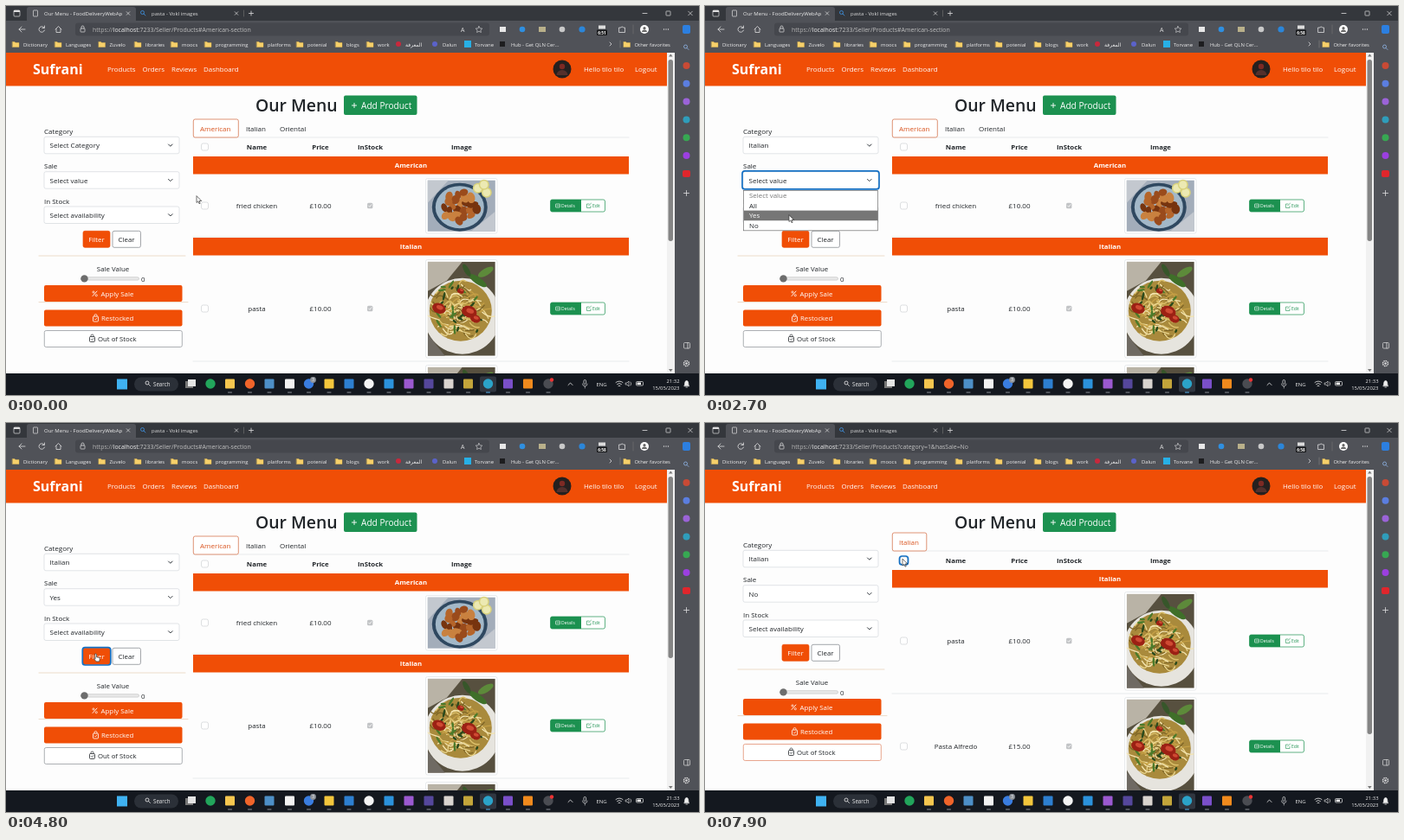
These frames come from a looping animation (800 px wide and 450 px high, 8000 ms). An HTML page:

```html
<!DOCTYPE html>
<html lang="en">
<head>
<meta charset="utf-8">
<style>
  html, body { margin: 0; width: 100%; height: 100%; overflow: hidden; background: #fff; }
  svg { display: block; width: 800px; height: 450px; font-family: "Open Sans", "Noto Sans", sans-serif; }
</style>
</head>
<body>
<svg viewBox="0 0 800 450">
  <defs id="defs"></defs>
  <g id="page"></g>
  <g id="chrome"></g>
  <g id="overlay"></g>
</svg>
<script>
const ORANGE = '#f04e06', INK = '#212529', GREEN = '#1c9150', LINE = '#dee2e6', BLUE = '#1470c4';
const LOOP = 8000, STEP = 100, ITEM = 11.6;
const $ = id => document.getElementById(id);

// SVG string helpers
const rect = (x, y, w, h, fill, more = '') => `<rect x="${x}" y="${y}" width="${w}" height="${h}" fill="${fill}" ${more}/>`;
const dot = (x, y, r, fill, more = '') => `<circle cx="${x}" cy="${y}" r="${r}" fill="${fill}" ${more}/>`;
const oval = (x, y, rx, ry, fill, turn = 0) =>
  `<ellipse rx="${rx}" ry="${ry}" fill="${fill}" transform="translate(${x} ${y}) rotate(${turn})"/>`;
const path = (d, stroke, w = 0.8, fill = 'none') =>
  `<path d="${d}" fill="${fill}" stroke="${stroke}" stroke-width="${w}" stroke-linejoin="round" stroke-linecap="round"/>`;
const text = (x, y, s, size = 8, fill = INK, more = '') => `<text x="${x}" y="${y}" font-size="${size}" fill="${fill}" ${more}>${s}</text>`;
const mid = (x, y, s, size, fill, more = '') => text(x, y, s, size, fill, `text-anchor="middle" ${more}`);
const bold = 'font-weight="700"';
const box = (x, y, w, h, fill, stroke, r = 2, sw = 0.7) => rect(x, y, w, h, fill, `rx="${r}" stroke="${stroke}" stroke-width="${sw}"`);
const hline = (x1, x2, y, color = LINE, w = 0.7) => path(`M${x1} ${y}H${x2}`, color, w);
const magnifier = (x, y, c) => dot(x, y, 2, 'none', `stroke="${c}" stroke-width=".8"`) + path(`M${x + 1.5} ${y + 1.5}l2 2`, c);
const cross = (x, y, r, c) => path(`M${x - r} ${y - r}l${2 * r} ${2 * r}m0 ${-2 * r}l${-2 * r} ${2 * r}`, c, 0.7);
const plus = (x, y, r, c, w = 0.8) => path(`M${x - r} ${y}h${2 * r}M${x} ${y - r}v${2 * r}`, c, w);

function random(seed) {
  return () => (seed = seed * 16807 % 2147483647) / 2147483647;
}

function pastaPhoto() {
  const rnd = random(11), between = (a, b) => a + (b - a) * rnd();
  let s = rect(0, 0, 78, 109, '#57503f') + path('M0 0H40L22 22 0 34z', 'none', 0, '#b9b3a6')
    + path('M0 109V84L20 109z', 'none', 0, '#6f6a63') + oval(40, 63, 44, 44, '#e6e4de') + oval(38, 57, 36, 35, '#a98a3c');
  const tones = ['#ecd892', '#dcc06a', '#7d6425', '#f3e4b0', '#c59f45'];
  for (let i = 0; i < 95; i++) {
    const a = between(0, 6.3), d = between(0, 31), x = 37 + d * Math.cos(a), y = 56 + d * Math.sin(a);
    s += path(`M${x - between(3, 9)} ${y}q${between(2, 9)} ${between(-12, 12)} ${between(8, 16)} ${between(-5, 7)}`, tones[i % 5], 1.3);
  }
  for (let i = 0; i < 26; i++) s += oval(between(8, 68), between(26, 88), between(2, 6), 1.3, i % 2 ? '#4b7a2a' : '#2b4a1c', between(0, 180));
  for (const [x, y, r] of [[13, 54, 8], [48, 58, 9], [55, 66, 6], [38, 34, 4]])
    s += oval(x, y, r, r * 0.75, '#9c2114', 20) + oval(x + 1, y - 1, r * 0.5, r * 0.3, '#cf4a33', 20);
  return s + oval(58, 22, 12, 4, '#3f6f29', 35) + oval(67, 12, 10, 4, '#5d8a3a', -30) + oval(45, 10, 8, 3, '#37562a', 60);
}

function chickenPhoto() {
  const rnd = random(5);
  let s = rect(0, 0, 78, 59, '#a3adba') + path('M0 0H24L0 26zM78 59H50L78 36z', 'none', 0, '#c3c8cf')
    + oval(37, 31, 32, 28, '#2f4860') + oval(37, 31, 28, 24.5, '#a3b8c8');
  for (const [x, y] of [[58, 9], [68, 14], [65, 5]]) s += dot(x, y, 6, '#d9d27c') + dot(x, y, 4.5, '#ece9b2');
  const tones = ['#b5652a', '#77340f', '#c9813f', '#9a4b1c'];
  for (let i = 0; i < 24; i++) {
    const a = i * 2.4, d = 4.3 * Math.sqrt(i);
    s += oval(37 + d * Math.cos(a), 31 + d * 0.85 * Math.sin(a), 4 + 3 * rnd(), 3 + 2 * rnd(), tones[i % 4], 180 * rnd());
  }
  return s;
}

$('defs').innerHTML = '<clipPath id="crop"><rect width="78" height="109"/></clipPath>'
  + `<g id="pasta" clip-path="url(#crop)">${pastaPhoto()}</g><g id="chicken">${chickenPhoto()}</g>`;

// Browser frame and taskbar
function chrome() {
  const pale = '#dededf', bar = '#505258';
  let s = rect(0, 0, 800, 18, '#34373c') + rect(24, 1, 126, 18, bar, 'rx="3"') + rect(0, 17, 800, 37, bar) + rect(772, 17, 28, 408, bar);
  s += box(9, 5, 7, 7, 'none', pale, 1) + rect(9, 5, 7, 2, pale) + box(31.5, 5, 5, 7, 'none', pale, 0.5)
    + text(44, 11, 'Our Menu - FoodDeliveryWebAp', 6, '#eee') + cross(141, 8.5, 1.8, pale)
    + magnifier(157.5, 7.5, '#3f95e6') + text(168, 11, 'pasta - Vokl images', 6, '#ddd') + cross(266, 8.5, 1.8, pale)
    + path('M274.500 5v7', '#666') + plus(283, 8.5, 2.5, pale)
    + path('M735 8.500h5', pale) + box(762, 6, 5, 5, 'none', pale, 0.5) + cross(790, 8.5, 2.3, pale);
  s += path('M22 27h-7m3-3l-3 3 3 3', pale) + path('M44 25a3.300 3.300 0 1 0 .500 3M44.500 23v2.500h-2.500', pale)
    + path('M57 27l3.500-3.500 3.500 3.500M58 26.500v4h5v-4', pale)
    + rect(80, 19.5, 478, 15, '#45474d', 'rx="3"') + box(86, 26, 5, 4, 'none', pale, 0.5) + path('M87 26v-1.500a1.500 1.500 0 0 1 3 0v1.500', pale)
    + text(525, 30, 'A', 7, pale) + path('M546 23.500l1.200 2.300 2.600.300-1.900 1.800.500 2.600-2.400-1.200-2.400 1.200.500-2.600-1.900-1.800 2.600-.300z', pale, 0.6)
    + rect(570, 24, 7, 6, '#e8e8e8') + dot(596, 27, 3.3, '#2f8fe0') + rect(615, 24, 8, 6, '#b9b08a') + dot(642, 27, 3.3, '#c9c9c9') + dot(665, 27, 3.6, '#2b86d9')
    + path('M708 25h2a1.300 1.300 0 0 1 2.500 0h2v5.500h-6.500z', pale) + path('M724 22v10', '#777', 0.6)
    + dot(737, 27, 5, '#fff') + dot(737, 25.7, 1.6, '#666') + path('M734 30a3 2.500 0 0 1 6 0z', 'none', 0, '#666')
    + [759.5, 762, 764.5].map(x => dot(x, 27, 0.7, pale)).join('');

  const folder = x => path(`M${x - 3.500} 41.500h2.500l1 1h4v5h-7.500z`, '#e8bd4a', 0.4, '#f7d06a');
  const folders = [[11, 'Dictionary'], [60, 'Languages'], [110.5, 'Zuvelo'], [152, 'libraries'], [194, 'moocs'], [233, 'programming'],
    [293, 'platforms'], [339, 'potenial'], [384, 'blogs'], [420, 'work'], [716.5, 'Other favorites']];
  for (const [x, name] of folders) s += folder(x) + text(x + 9, 46.5, name, 5.9, '#eee');
  s += dot(453, 44, 3, '#c8283c') + text(461, 46.5, 'المعرفة', 6, '#eee') + dot(495, 44, 3, '#5b62c9') + text(504, 46.5, 'Dalun', 5.9, '#eee')
    + rect(529, 40, 8, 8, '#27b0e6') + text(541, 46.5, 'Torvane', 5.9, '#eee') + rect(570, 41, 6, 6, '#1d1d1f')
    + text(583, 46.5, 'Hub - Get QLN Cer...', 5.9, '#eee') + path('M697 42l2 2-2 2', pale) + path('M709 40v8', '#888', 0.6);

  s += rect(781, 22, 9, 10, '#2c7fe0', 'rx="2"') + magnifier(784.5, 47, '#8fb4e8');
  ['#c94a35', '#5b7ee0', '#9b63d8', '#2f9dbb', '#37a852', '#9c3fe0'].forEach((c, i) => s += dot(785.5, 69 + 20.8 * i, 4, c));
  s += rect(781, 190, 9, 8, '#e0262c', 'rx="2"') + plus(785.5, 216.5, 3, pale)
    + box(782.5, 389.5, 7, 6.5, 'none', pale, 1) + path('M787 389.500v6.500', pale)
    + dot(785.5, 413.5, 3, 'none', `stroke="${pale}" stroke-width="1.4" stroke-dasharray="1.6 .7"`) + dot(785.5, 413.5, 1.2, pale);

  s += rect(0, 425, 800, 25, '#14181f') + rect(128, 431.5, 12, 12, '#3fb2f2') + rect(148, 429.5, 51, 16, '#2b3038', 'rx="8"')
    + magnifier(163, 436, '#eee') + text(170, 439.8, 'Search', 6.2, '#eee')
    + rect(207, 434, 9, 8, '#777') + rect(210, 432, 9, 8, '#e4e4e4') + rect(547, 428.5, 19, 18, '#303640', 'rx="2"');
  const apps = [[236, '#22a55b', 1], [258.5, '#f5c64f', 0], [281.5, '#f0642a', 1], [304, '#4d8fc7', 0], [327.5, '#f2f2f2', 0], [349.5, '#3a7de0', 1],
    [373, '#f3c63c', 0], [396, '#2d7fd0', 0], [419, '#f4f4f4', 1], [442, '#2b92dc', 0], [465, '#9b59d0', 0], [488, '#55479b', 0],
    [511, '#d9d4cf', 0], [533.5, '#c3a53a', 0], [556.5, '#2ba3c9', 1], [579.5, '#7a4fc9', 0], [602.5, '#f08a1d', 0], [626, '#4a4c52', 1]];
  apps.forEach(([x, c, round], i) => {
    s += round ? dot(x, 437, 5.7, c) : rect(x - 5.5, 431.5, 11, 11, c, 'rx="1"');
    if (i > 0) s += hline(x - 2, x + 2, 447, i === 14 ? '#5bb8f5' : '#8b8f96', 1);
  });
  s += dot(354.5, 432.5, 3.4, '#8d9299') + mid(354.5, 434.2, '3', 4.5, '#fff') + dot(630, 432.5, 2.2, '#e33');
  return s + path('M649 438.500l2.500-2.500 2.500 2.500', '#eee') + box(667, 432.5, 2.6, 5, 'none', '#eee', 1.3)
    + path('M665.500 437a2.800 2.800 0 0 0 5.600 0M668.300 440v2', '#eee', 0.6) + text(681.5, 439.5, 'ENG', 6, '#eee')
    + path('M704 435.500a6 6 0 0 1 8 0M705.500 437.500a4 4 0 0 1 5 0M707 439.500a2 2 0 0 1 2 0', '#eee')
    + path('M715.500 436h1.500l2-2v6l-2-2h-1.500zM721 435a3 3 0 0 1 0 4', '#eee', 0.6)
    + box(727.5, 434.5, 8, 4.5, '#14181f', '#eee', 1) + rect(728.5, 435.5, 4.5, 2.5, '#eee')
    + text(777.5, 444, '15/05/2023', 5.9, '#eee', 'text-anchor="end"') + path('M783 439.500c1.200-1.500 0-6 2.700-6s1.500 4.500 2.700 6zM785 441h1.500', '#eee', 0.7, '#eee');
}

// Shop page parts
const check = (x, y) => box(x - 4, y - 4, 8, 8, '#fff', '#cfd2d5', 2);
const ring = (x, y, w, h, c = BLUE) => box(x, y, w, h, 'none', c, 3, 1.7);

function select(y, label, value, focus) {
  return text(44, y - 3.3, label) + box(44, y, 156, 19.5, '#fff', '#d5d9dd') + (focus ? ring(43, y - 0.8, 158, 21, focus) : '')
    + text(50.5, y + 13, value) + path(`M187.500 ${y + 8.700}l2.300 2.300 2.300-2.300`, '#343a40', 1);
}

function dropdown(y, items, chosen, pointerY) {
  const over = Math.floor((pointerY - y) / ITEM), active = over < 0 ? chosen : Math.min(over, items.length - 1);
  return box(44.5, y, 155, items.length * ITEM, '#fff', '#6f6f6f', 0) + items.map((item, i) => {
    const top = y + i * ITEM, lit = i === active && i > 0;
    return (lit ? rect(45, top, 154.5, ITEM, '#767676') : '') + text(51, top + 8.7, item, 7.9, lit ? '#fff' : i ? INK : '#777');
  }).join('');
}

function bag(x, y, c) {
  return box(x - 3, y - 2, 6, 6, 'none', c, 1, 0.8) + path(`M${x - 1.500} ${y - 2}v-1a1.500 1.500 0 0 1 3 0v1M${x - 1.200} ${y + 1}l1 1 1.600-2`, c, 0.7);
}

function row(y, name, price, photo, photoH) {
  const h = photoH + 13, cy = y + h / 2;
  return check(229.5, cy) + mid(289.5, cy + 3, name, 8, INK) + mid(363, cy + 3, price, 8, INK)
    + rect(417, cy - 3.2, 6.4, 6.4, '#c2c4c6', 'rx="1.5"') + path(`M418.500 ${cy}l1.300 1.300 2.200-2.600`, '#fff')
    + box(484.5, y + 4.5, 82.5, photoH + 4.5, '#fff', LINE) + `<use href="#${photo}" x="486.800" y="${y + 6.700}"/>`
    + box(628.5, cy - 7, 63, 14, '#fff', GREEN, 2) + path(`M664 ${cy - 7}h-33.500q-2 0-2 2v10q0 2 2 2h33.500z`, 'none', 0, GREEN)
    + box(634.5, cy - 2, 5, 4, 'none', '#fff', 0.5, 0.6) + path(`M636 ${cy}h2.500`, '#fff', 0.6) + text(641, cy + 1.9, 'Details', 5, '#fff')
    + path(`M673 ${cy - 2}h-2.500v4.500h4.500v-2M672.500 ${cy}l3-2.800`, GREEN, 0.6) + text(677, cy + 1.9, 'Edit', 5, GREEN)
    + hline(216, 719, y + h);
}

function header(y, xs) {
  return check(xs[0], y) + ['Name', 'Price', 'InStock', 'Image'].map((s, i) => mid(xs[i + 1], y + 3, s, 7.8, INK, bold)).join('');
}
const band = (y, name) => rect(216, y, 503, 20.5, ORANGE) + mid(467.5, y + 13, name, 7.8, '#fff', bold);
const tab = (y, w) => hline(216, 719, y + 21) + box(216.3, y, w, 21, '#fff', '#d1653a', 2);
const COLS = [229.5, 289.5, 363, 420.5, 526];

function table(view) {
  if (view === 'empty')
    return header(138, [244.5, 327.5, 429, 541.5, 662]) + hline(216, 719, 148.5, '#b9bcc0', 0.9) + hline(0, 763, 399.5)
      + text(44, 409, '© 2023 - FoodDeliveryWebApp - <tspan fill="#0a58ca" text-decoration="underline">Privacy</tspan>', 7.9, '#6c757d');
  if (view === 'sale-no')
    return tab(127, 39.5) + text(224, 141, 'Italian', 8, '#d9531e') + header(159, COLS) + band(170, 'Italian')
      + row(191, 'pasta', '£10.00', 'pasta', 109) + row(313, 'Pasta Alfredo', '£15.00', 'pasta', 109);
  return tab(131, 52) + text(224, 145, 'American', 8, '#d9531e') + text(277, 145, 'Italian') + text(316, 145, 'Oriental')
    + header(163, COLS) + band(174, 'American') + row(195, 'fried chicken', '£10.00', 'chicken', 59)
    + band(268, 'Italian') + row(289, 'pasta', '£10.00', 'pasta', 109) + row(411, 'Pasta Alfredo', '£15.00', 'pasta', 109);
}

function page(s) {
  const dy = s.view === 'all' ? 0 : -4, thumb = { all: 210, empty: 354, 'sale-no': 298 }[s.view];
  let out = rect(0, 53, 772, 372, '#fdfdfd') + rect(763, 53, 9, 372, '#f1f1f1') + rect(764.5, 62, 5.5, thumb, '#858585', 'rx="2.7"')
    + path('M765 58.500l2.300-3 2.300 3zM765 420l2.300 3 2.300-3z', 'none', 0, '#777')
    + rect(0, 53, 763, 39.5, ORANGE) + text(31, 79.3, 'Sufrani', 16, '#fff', bold);
  for (const [x, name] of [[117, 'Products'], [157.5, 'Orders'], [191, 'Reviews'], [228, 'Dashboard'], [667, 'Hello tilo tilo'], [726, 'Logout']])
    out += text(x, 76, name, 7.9, '#fff');
  out += dot(642, 73, 10.5, '#25201f') + dot(642, 70, 3.2, '#7d2a24') + path('M635.500 80a6.500 6 0 0 1 13 0z', 'none', 0, '#54302c')
    + text(288, 122, 'Our Menu', 19.4, INK, 'font-weight="600"') + rect(390, 103.5, 84.5, 22.5, GREEN, 'rx="2"')
    + plus(402, 115, 2.6, '#fff', 0.9) + text(410, 118.7, 'Add Product', 10.1, '#fff') + table(s.view);

  const saleItems = ['Select value', 'All', 'Yes', 'No'], categories = ['Select Category', 'All', 'Italian', 'American', 'Oriental'];
  let side = select(151.3, 'Category', categories[s.category], s.focus === 'category' && '#8dbff5')
    + select(191.7, 'Sale', saleItems[s.sale], s.focus === 'sale' && BLUE) + select(232, 'In Stock', 'Select availability')
    + box(89, 260.3, 31, 19, ORANGE, ORANGE) + mid(104.5, 273, 'Filter', 7.9, '#fff') + box(123, 260.3, 32.5, 19, '#fff', '#7d8287') + mid(139, 273, 'Clear', 7.9, INK)
    + (s.focus === 'filter' ? ring(88.3, 259.7, 32.5, 20.3) : '')
    + hline(38, 207, 289, '#e6cdb4') + mid(123.5, 307, 'Sale Value', 7.9, INK)
    + box(86.5, 313.7, 67, 3.4, '#e9e9e9', '#bbb', 1.7, 0.6) + dot(90.5, 315.4, 4.2, '#6d6d6d') + text(156, 319.3, '0', 7.9)
    + rect(44, 323, 159.5, 19, ORANGE, 'rx="2"') + path('M100 335.500l5-5.500', '#fff', 0.9)
    + dot(101, 331, 1.1, 'none', 'stroke="#fff" stroke-width=".7"') + dot(104.3, 334.7, 1.1, 'none', 'stroke="#fff" stroke-width=".7"') + text(109.5, 335.5, 'Apply Sale', 7.9, '#fff')
    + hline(38, 210, 342.6, '#e6cdb4') + rect(44, 351.5, 159.5, 19, ORANGE, 'rx="2"') + bag(103.5, 361, '#fff') + text(110, 364.3, 'Restocked', 7.8, '#fff')
    + box(44.3, 375.5, 159, 19, '#fff', dy ? '#e0825f' : '#8a8f94') + bag(99.5, 384.5, INK) + text(106, 388, 'Out of Stock', 7.8);
  if (s.open === 'category') side += dropdown(173, categories, s.category, s.y - dy);
  if (s.open === 'sale') side += dropdown(213.4, saleItems, s.sale, s.y - dy);
  out += `<g transform="translate(0 ${dy})">${side}</g>`;
  return s.focus === 'check' ? out + ring(224.5, 154, 10, 10) : out;
}

function overlay(s) {
  const query = { all: '#American-section', empty: '?category=1&amp;hasSale=Yes', 'sale-no': '?category=1&amp;hasSale=No' }[s.view];
  const arrow = 'M0 0v7.500l1.800-1.600 1.200 2.800 1.200-.500-1.200-2.700h2.400z';
  const hand = 'M0 0q1.300-.600 1.500.700v3l3 .700q1 .300.800 1.500l-.600 3h-3.700l-2.500-3.500q0-1.200 1.500 0z';
  return text(100, 29.6, `<tspan fill="#b4b4b4">https://</tspan>localhost<tspan fill="#c2c2c2">:7233/Seller/Products${query}</tspan>`, 6.95, '#f2f2f2')
    + rect(684, 22.5, 8, 4, '#ddd') + rect(682, 27.5, 12, 6.5, '#17181a', 'rx="1"') + mid(688, 32.7, s.badge, 4.8, '#fff', bold)
    + text(777.5, 435.7, s.clock, 5.9, '#eee', 'text-anchor="end"')
    + `<g transform="translate(${s.x} ${s.y})">${path(s.hand ? hand : arrow, '#333', 0.7, '#fff')}</g>`;
}

// Timeline: [start, value] steps and [time, x, y] pointer stops
const timeline = {
  view: [[0, 'all'], [5200, 'empty'], [7300, 'sale-no']],
  open: [[0, ''], [1000, 'category'], [1900, ''], [2300, 'sale'], [2900, ''], [5900, 'sale'], [6700, '']],
  focus: [[0, ''], [1000, 'category'], [2300, 'sale'], [4600, 'filter'], [5200, ''], [5900, 'sale'], [7000, 'filter'], [7300, ''], [7900, 'check']],
  category: [[0, 0], [1900, 2]],
  sale: [[0, 0], [2900, 2], [6800, 3]],
  hand: [[0, false], [4400, true], [5300, false], [6900, true], [7300, false]],
  badge: [[0, '6:51'], [1900, '6:58']],
  clock: [[0, '21:32'], [1900, '21:33']],
};
const pointer = [[0, 220, 220], [200, 218, 218], [800, 126, 163], [1100, 126, 163], [1700, 126, 204], [1900, 126, 204], [2200, 105, 203],
  [2400, 103, 205], [2700, 97, 242], [2900, 97, 243], [3500, 112, 275], [4000, 116, 282], [4400, 104, 268], [4800, 103, 267],
  [5400, 103, 267], [5800, 100, 199], [6000, 100, 201], [6300, 98, 228], [6500, 98, 247], [6700, 98, 247], [6900, 103, 264],
  [7300, 103, 264], [7600, 185, 205], [7800, 228, 158], [8000, 228, 157]];

function stateAt(t) {
  const s = {};
  for (const key in timeline) s[key] = timeline[key].findLast(([start]) => start <= t)[1];
  const i = pointer.findIndex(([time]) => time > t), [t0, x0, y0] = pointer[i - 1], [t1, x1, y1] = pointer[i];
  const k = (t - t0) / (t1 - t0), ease = k * k * (3 - 2 * k);
  s.x = x0 + (x1 - x0) * ease;
  s.y = y0 + (y1 - y0) * ease;
  return s;
}

let shown = -1;
const begin = performance.now();
function tick() {
  const t = Math.floor((performance.now() - begin) % LOOP / STEP) * STEP;
  if (t !== shown) {
    const s = stateAt(shown = t);
    $('page').innerHTML = page(s);
    $('overlay').innerHTML = overlay(s);
  }
  requestAnimationFrame(tick);
}
$('chrome').innerHTML = chrome();
tick();
</script>
</body>
</html>
```
